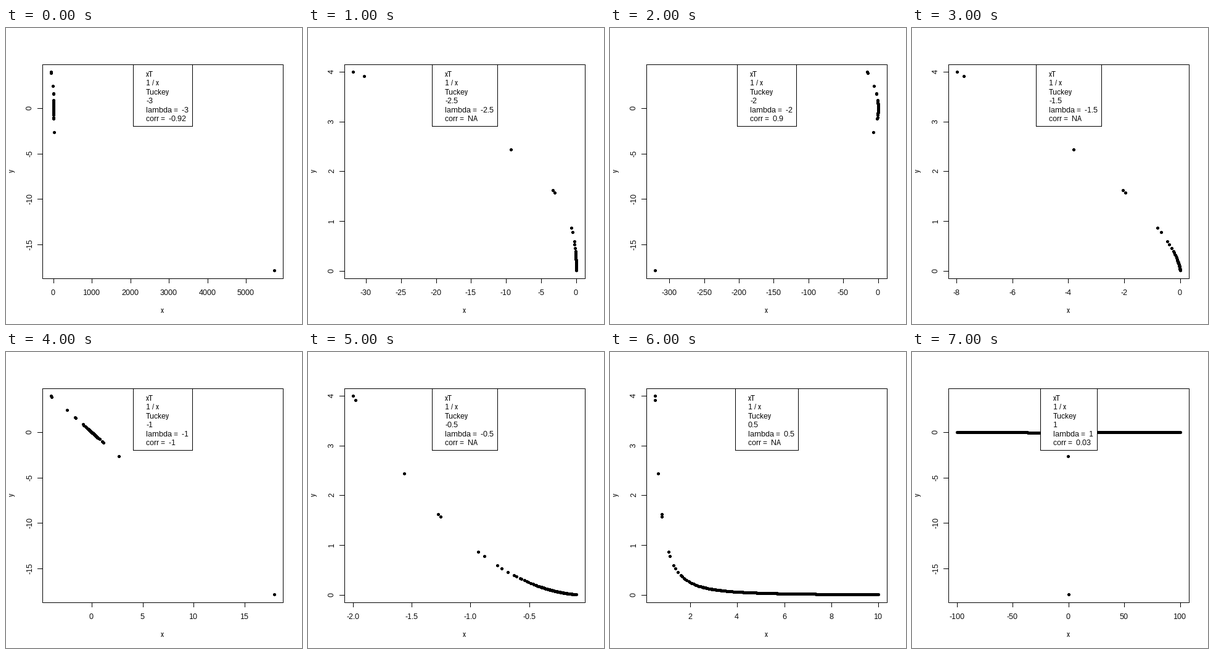
Animation of 480 by 480 pixels, one loop 8 s. Source, as a matplotlib script:

```python
import math

import numpy as np
import matplotlib.pyplot as plt
from matplotlib.animation import FuncAnimation
from matplotlib.collections import PolyCollection
from matplotlib.patches import Rectangle

plt.rcParams.update({
    "font.family": "Liberation Sans",
    "font.size": 12,
    "text.hinting": "native",
    "text.hinting_factor": 1,
    "axes.unicode_minus": False,
})

SIZE = 480
LEFT, RIGHT, TOP, BOTTOM = 59, 449, 59, 406
MARGIN = 14.4  # one text line
PAD = 0.04

# Powers in steps of one half, without zero
POWERS = [k / 2 for k in range(-6, 3) if k]

# Dot of five pixels with the corners cut, relative to its pixel
DOT = np.array([(-1, -2), (2, -2), (2, -1), (3, -1), (3, 2), (2, 2),
                (2, 3), (-1, 3), (-1, 2), (-2, 2), (-2, -1), (-1, -1)])


def make_x():
    """Even scatter over -100..100; the few values near zero are set."""
    rng = np.random.default_rng(4)

    def spread(start, end, count):
        x = np.linspace(start, end, count)
        x[1:-1] += rng.uniform(-0.5, 0.5, count - 2) * (x[1] - x[0])
        return x

    peaks = [3.993, 3.913, 2.441, 1.618, 1.57, 0.868, 0.778, 0.594, 0.535,
             0.461, 0.395, -1.0, -1.13, -2.65, -17.9]
    return np.concatenate([1 / np.array(peaks), spread(2.7, 99.9, 482),
                           spread(-99.9, -1.3, 493)])


X = make_x()


def transform(power):
    """Power transform; fractional powers exist for positive x only."""
    x = X if power.is_integer() else X[X > 0]
    return math.copysign(1, power) * x ** power, 1 / x


def correlation(power):
    if not power.is_integer():
        return "NA"
    return f"{round(np.corrcoef(*transform(power))[0, 1], 2):g}"


def nice_step(span):
    """Round tick step (1, 2 or 5 times a power of ten) for about 5 ticks."""
    cell = span / 5
    base = 10.0 ** math.floor(math.log10(cell))
    step = base
    for factor, bias in ((2, 0.8), (5, 1.7), (10, 0.8)):
        if factor * base - cell < bias * (cell - step):
            step = factor * base
    return step


class Scale:
    """Maps data to whole pixels, with a margin on both sides."""

    def __init__(self, values, start, end):
        lo, hi = values.min(), values.max()
        pad = PAD * (hi - lo)
        self.lo, self.hi = lo - pad, hi + pad
        self.start, self.end = start, end

    def __call__(self, v):
        part = (v - self.lo) / (self.hi - self.lo)
        return np.floor(self.start + part * (self.end - self.start))

    def ticks(self):
        """Pixel and label of each tick."""
        step = nice_step(self.hi - self.lo)
        digits = 1 if step < 1 else 0
        first, last = math.ceil(self.lo / step), math.floor(self.hi / step)
        for k in range(first, last + 1):
            yield self(k * step), f"{k * step:.{digits}f}"


fig = plt.figure(figsize=(SIZE / 72, SIZE / 72), dpi=72, facecolor="white")
ax = fig.add_axes([0, 0, 1, 1])


# Whole coordinates snap to the pixel of that number
def line(x0, y0, x1, y1):
    ax.plot([x0, x1], [y0, y1], color="black", lw=1,
            solid_capstyle="projecting", antialiased=False)


def box(x0, y0, x1, y1, fill):
    ax.add_patch(Rectangle((x0, y0), x1 - x0, y1 - y0, lw=1,
                           facecolor=fill, edgecolor="black",
                           antialiased=False, zorder=3))


def label(x, y, text, ha="center", angle=0):
    ax.text(x, y, text, ha=ha, va="baseline", rotation=angle,
            rotation_mode="anchor", color="black", zorder=4)


def draw_axes(sx, sy):
    for px, text in sx.ticks():
        line(px, BOTTOM, px, BOTTOM + 7)
        label(px - 0.5, 433, text)
    for py, text in sy.ticks():
        line(LEFT - 8, py, LEFT, py)
        label(42, py - 0.5, text, angle=90)
    box(LEFT, TOP, RIGHT, BOTTOM, "none")
    label(253, 462, "x")
    label(13, 232, "y", angle=90)


def draw_legend(power):
    name = f"{power:g}"
    width = 92 + 4 * (power < 0) + 10 * ("." in name)
    left = 254 - width // 2
    box(left, TOP, left + width, TOP + 100, "white")
    rows = ["xT", "1 / x", "Tuckey", name, f"lambda =  {name}",
            f"corr =  {correlation(power)}"]
    for i, row in enumerate(rows):
        label(left + 21, round(79 + MARGIN * i), row, ha="left")


def draw(i):
    power = POWERS[i]
    ax.cla()
    ax.axis("off")
    xt, y = transform(power)
    sx = Scale(xt, 4.1 * MARGIN, SIZE - 2.1 * MARGIN)
    sy = Scale(y, SIZE - 5.1 * MARGIN, 4.1 * MARGIN)
    dots = np.unique(np.column_stack([sx(xt), sy(y)]), axis=0)
    ax.add_collection(PolyCollection(dots[:, None, :] + DOT,
                                     facecolor="black", linewidth=0,
                                     antialiased=False), autolim=False)
    draw_axes(sx, sy)
    draw_legend(power)
    ax.set(xlim=(0, SIZE), ylim=(SIZE, 0))
    return []


anim = FuncAnimation(fig, draw, frames=len(POWERS), interval=1000,
                     init_func=lambda: [], repeat=True, repeat_delay=0)
plt.show()
```
